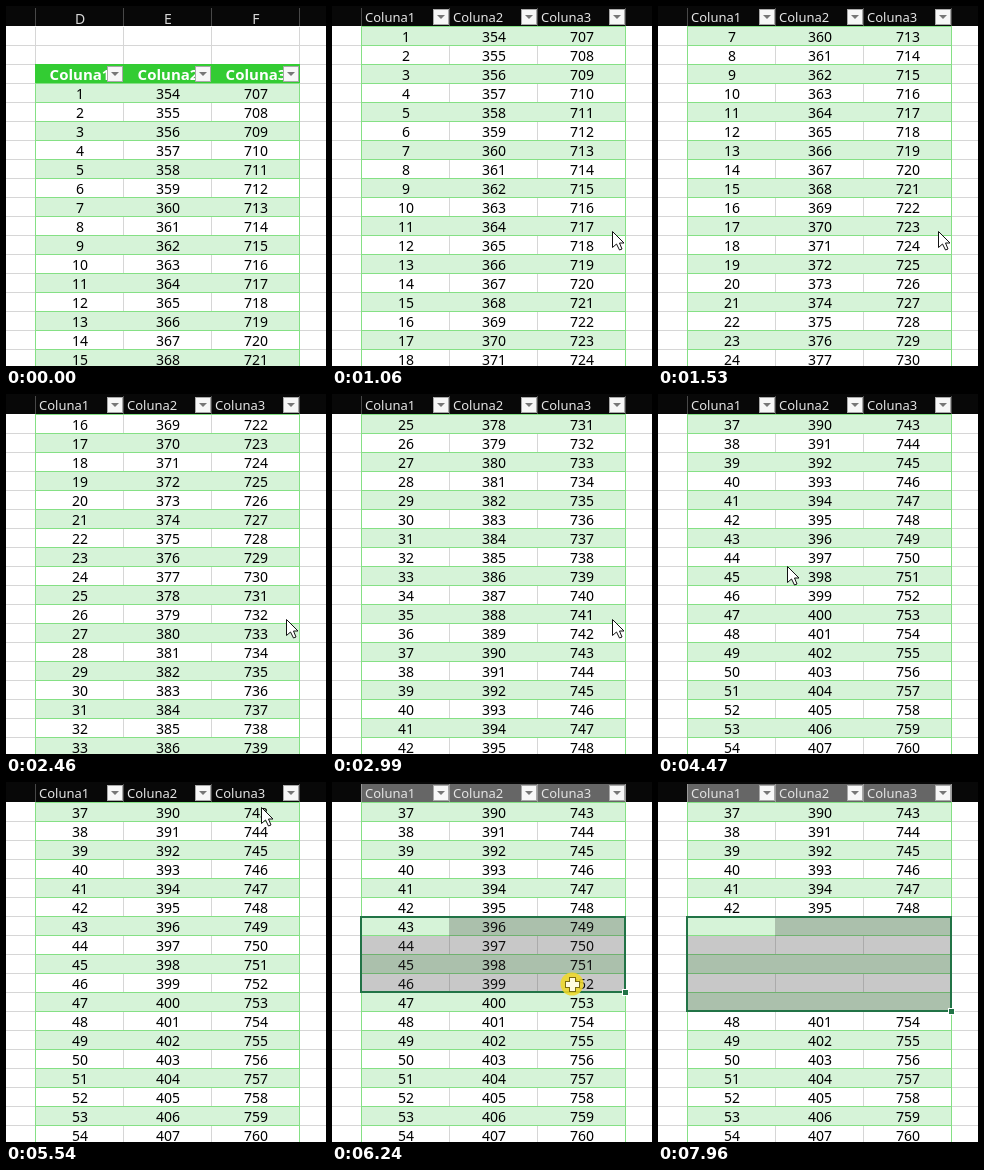
Write an HTML page with a canvas that moves like this. It is 320 by 360 pixels and loops after 8 s.

```html
<!DOCTYPE html>
<html lang="pt">
<head>
<meta charset="utf-8">
<style>
  html, body { margin: 0; width: 100%; height: 100%; overflow: hidden; background: #fff; }
  canvas { display: block; width: 320px; height: 360px; }
</style>
</head>
<body>
<canvas id="stage" width="320" height="360"></canvas>
<script>
const ctx = document.getElementById('stage').getContext('2d');
const LOOP = 8000, W = 320, H = 360;
const LEFT = 29, COL = 88, RIGHT = LEFT + 3 * COL, TOP = 21, ROW = 19;
const FONT = '"Noto Sans", "Open Sans", sans-serif';

// Each wheel tick scrolls three rows.
const SCROLLS = [1060, 1260, 1530, 1660, 1930, 2460, 2660, 2790, 2990, 3190, 3390, 3940, 4120];
const PRESS = 5820, RELEASE = 6830, CLEAR = 7960;

// Time, x, y; the pointer jumps from place to place.
const POINTER = [
  [190, 292, 324], [250, 290, 290], [320, 284, 250], [380, 280, 225],
  [4320, 270, 222], [4400, 212, 202], [4470, 129, 172], [4540, 75, 148],
  [4610, 50, 134], [4680, 60, 145], [4810, 81, 156],
  [5010, 92, 120], [5080, 118, 60], [5150, 158, 14], [5210, 205, 3], [5280, 250, 2], [5350, 281, 5],
  [5540, 255, 25], [5610, 190, 70], [5680, 130, 120], [5750, 97, 146],
  [5820, 95, 148], [5890, 100, 150], [5960, 125, 157], [6030, 160, 169],
  [6100, 195, 182], [6170, 222, 193], [6240, 240, 202], [6310, 250, 208],
  [6360, 255, 210], [6420, 260, 213], [6490, 264, 215],
  [6830, 286, 231], [6960, 306, 241], [7160, 309, 244], [7230, 311, 247]
];

const colX = c => LEFT + c * COL;
const rowY = r => TOP + r * ROW;

function rect(x, y, w, h, color) {
  ctx.fillStyle = color;
  ctx.fillRect(x, y, w, h);
}

function label(text, x, y, color, size = 14, weight = 400, align = 'center') {
  ctx.font = `${weight} ${size}px ${FONT}`;
  ctx.textAlign = align;
  ctx.fillStyle = color;
  ctx.fillText(text, x, y);
}

function polygon(points, fill, stroke) {
  ctx.beginPath();
  points.forEach(([x, y]) => ctx.lineTo(x, y));
  ctx.closePath();
  ctx.fillStyle = fill;
  ctx.fill();
  if (stroke) {
    ctx.strokeStyle = stroke;
    ctx.lineWidth = 1;
    ctx.stroke();
  }
}

function filterButton(c, y) {
  const x = colX(c) + 72;
  rect(x, y, 16, 16, '#a8a8a8');
  rect(x + 1, y + 1, 14, 14, '#f7f7f7');
  polygon([[x + 4, y + 6], [x + 12, y + 6], [x + 8, y + 10]], '#777');
}

function pointerAt(t) {
  return POINTER.filter(p => p[0] <= t).pop();
}

function selectionAt(t) {
  if (t < PRESS) return null;
  const [, x, y] = pointerAt(Math.min(t, RELEASE - 1));
  return { row: 6, cols: Math.floor((x - LEFT) / COL) + 1, rows: Math.floor((y - TOP) / ROW) - 5 };
}

function drawGrid() {
  for (let r = 0; r < 18; r++) rect(0, rowY(r) + 18, W, 1, '#d6d6d6');
  for (let c = 0; c < 4; c++) rect(colX(c), TOP, 1, H, '#d6d6d6');
}

function drawRow(n, r, hideText) {
  const y = rowY(r);
  if (n < 0) return;
  if (n === 0) {
    rect(LEFT, y - 1, RIGHT - LEFT + 1, ROW, '#33cc33');
    for (let c = 0; c < 3; c++) {
      label('Coluna' + (c + 1), colX(c) + 45, y + 15, '#fff', 15, 700);
      filterButton(c, y + 1);
    }
    return;
  }
  if (n % 2) rect(LEFT, y, RIGHT - LEFT, 18, '#d6f3d8');
  rect(LEFT, y - 1, RIGHT - LEFT + 1, 1, '#85e085');
  rect(LEFT, y + 18, RIGHT - LEFT + 1, 1, '#85e085');
  rect(LEFT, y, 1, 18, '#85e085');
  rect(RIGHT, y, 1, 18, '#85e085');
  if (hideText) return;
  for (let c = 0; c < 3; c++) label(n + 353 * c, colX(c) + 45, y + 15, '#000');
}

function drawColumnHeads(scrolled, sel) {
  rect(0, 0, W, 20, '#080808');
  for (let c = 0; c < 3; c++) {
    if (sel && c < sel.cols) rect(colX(c), 2, COL + 1, 18, '#666');
  }
  for (let c = 0; c < 4; c++) rect(colX(c), 2, 1, 18, sel ? '#999' : '#484848');
  for (let c = 0; c < 3; c++) {
    if (scrolled) {
      label('Coluna' + (c + 1), colX(c) + 4, 16, '#e4e4e4', 13, 400, 'left');
      filterButton(c, 3);
    } else {
      label('DEF'[c], colX(c) + 45, 18, '#d8d8d8');
    }
  }
}

function drawSelection({ row, cols, rows }) {
  const y = rowY(row), w = cols * COL, h = rows * ROW;
  const shade = 'rgba(60,60,60,0.28)';
  rect(LEFT + COL, y, w - COL, ROW, shade);
  rect(LEFT, y + ROW, w, h - ROW, shade);
  ctx.strokeStyle = '#217346';
  ctx.lineWidth = 2;
  ctx.strokeRect(LEFT, y, w, h - 1);
  rect(LEFT + w - 3, y + h - 4, 7, 7, '#fff');
  rect(LEFT + w - 2, y + h - 3, 5, 5, '#217346');
}

function drawArrow(x, y) {
  const shape = [[0, 0], [0, 16], [4, 12.5], [7, 18.5], [9.5, 17.5], [7, 11.5], [11.5, 11.5]];
  polygon(shape.map(([dx, dy]) => [x + dx + 0.5, y + dy + 0.5]), '#fff', '#111');
}

function drawCross(x, y, pressed) {
  if (pressed) {
    ctx.beginPath();
    ctx.arc(x, y, 11.5, 0, 2 * Math.PI);
    ctx.fillStyle = 'rgba(240,216,40,0.87)';
    ctx.fill();
  }
  const edge = pressed ? '#7a6a10' : '#333';
  rect(x - 7, y - 3, 15, 7, edge);
  rect(x - 3, y - 7, 7, 15, edge);
  const core = pressed ? '#fffbe0' : '#fff';
  rect(x - 6, y - 2, 13, 5, core);
  rect(x - 2, y - 6, 5, 13, core);
}

function draw(t) {
  const ticks = SCROLLS.filter(s => s <= t).length;
  const first = 3 * ticks - 2;
  const sel = selectionAt(t);
  rect(0, 0, W, H, '#fff');
  drawGrid();
  for (let r = 0; r < 18; r++) {
    const selected = sel && r >= sel.row && r < sel.row + sel.rows;
    drawRow(first + r, r, selected && t >= CLEAR);
  }
  drawColumnHeads(ticks > 0, sel);
  if (sel) drawSelection(sel);

  const pointer = pointerAt(t);
  if (!pointer || t >= CLEAR) return;
  const [, x, y] = pointer;
  if (t < PRESS) drawArrow(x, y);
  else drawCross(x, y, t < RELEASE);
}

const start = performance.now();
function tick() {
  draw((performance.now() - start) % LOOP);
  requestAnimationFrame(tick);
}
tick();
</script>
</body>
</html>
```
